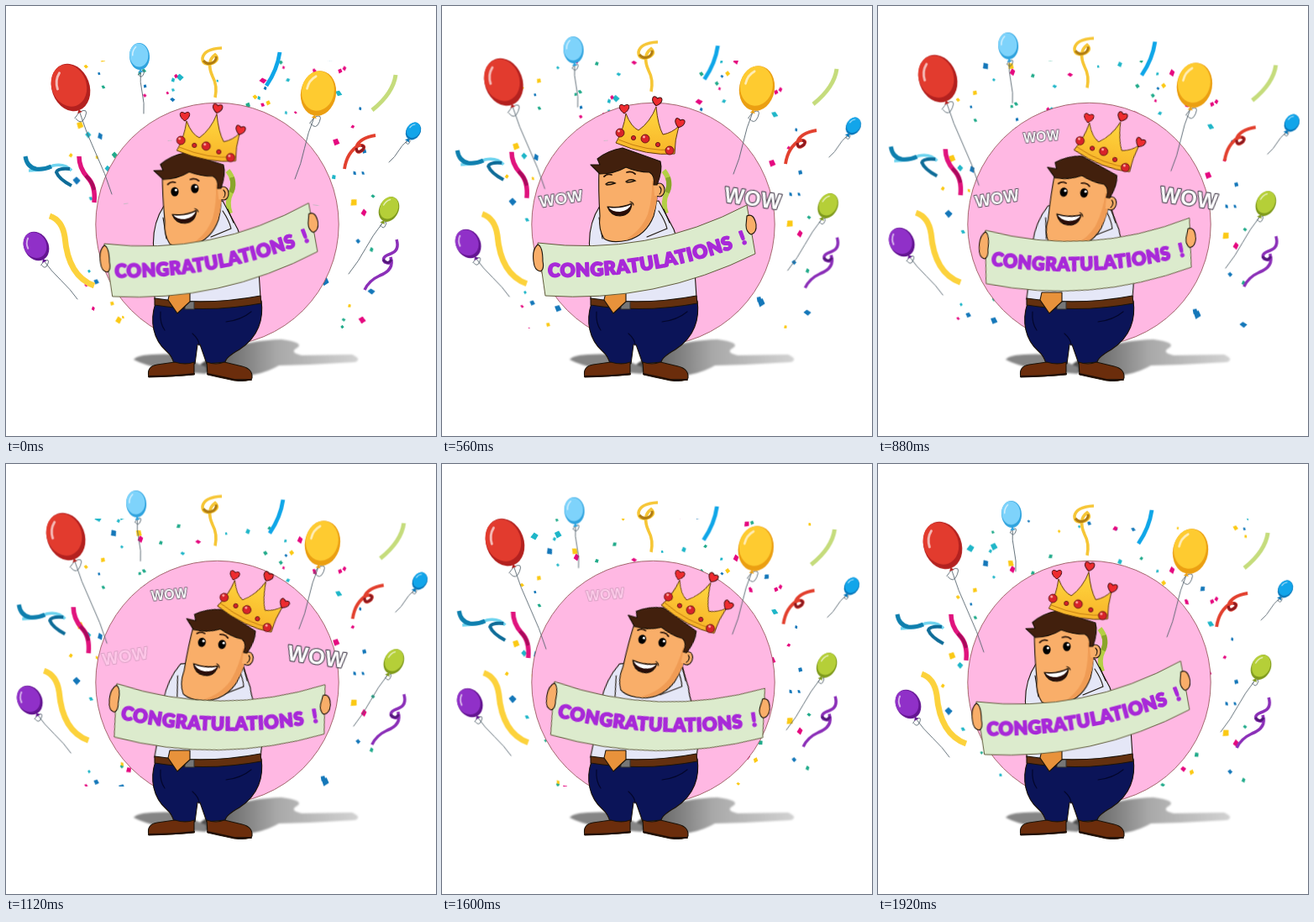
Animation, 512 px wide and 512 px high, one loop 2000 ms. Source, as an HTML page:

```html
<!DOCTYPE html>
<html lang="en">
<head>
<meta charset="utf-8">
<title>Congratulations</title>
<style>
html, body { margin: 0; width: 100%; height: 100%; overflow: hidden; background: #fff; }
svg { display: block; width: 100vw; height: 100vh; }
.ink { stroke: #1a1209; stroke-width: 1.1; stroke-linejoin: round; }
.line { fill: none; stroke-linecap: round; }
.ribbon path { fill: none; }
.skin { fill: #f9ae69; }

.drift { animation: drift 1s cubic-bezier(.37, 0, .63, 1) infinite alternate; }
.fall { animation: fall 2s linear infinite; }
.shirt { animation: lean 2s infinite; transform-origin: 0 348px; }
.head { animation: head 2s infinite; }
.crown { animation: crown 2s infinite; }
.banner { animation: banner 2s infinite; }
.face { animation: nod 2s infinite; }
.open { animation: open 2s step-end infinite; }
.shut { animation: shut 2s step-end infinite; }
.wow text {
  font: bold 25px "Liberation Sans", Arial, sans-serif; letter-spacing: .5px; text-anchor: middle;
  fill: #fff; stroke: #5a525f; stroke-width: 2.4; stroke-linejoin: round; paint-order: stroke;
  animation: wow 2s linear infinite both;
}
.title {
  font: 900 22px Lato, "Open Sans", sans-serif; letter-spacing: .6px; word-spacing: 5px;
  fill: #a829d8; stroke: #a829d8; stroke-width: 1.7; stroke-linejoin: round;
}

@keyframes drift { to { transform: translate(var(--dx), var(--dy)); } }
@keyframes fall { to { transform: translateY(90px); } }
@keyframes lean {
  0%, 28%, 96%, 100% { transform: skewX(0deg); }
  28% { animation-timing-function: ease-in; }
  44% { transform: skewX(-7.5deg); animation-timing-function: ease-out; }
  64% { transform: skewX(-11deg); }
  80% { transform: skewX(-12deg); animation-timing-function: ease-in-out; }
}
@keyframes head {
  0%, 96%, 100% { transform: translate(176px, 195px) rotate(-2deg); animation-timing-function: ease-out; }
  12% { transform: translate(178px, 189px) rotate(0deg); }
  28% { transform: translate(177px, 188px) rotate(0deg); animation-timing-function: ease-in; }
  44% { transform: translate(202px, 191px) rotate(9.5deg); animation-timing-function: ease-out; }
  64% { transform: translate(219px, 181px) rotate(14deg); }
  80% { transform: translate(222px, 179px) rotate(16deg); animation-timing-function: ease-in-out; }
}
@keyframes crown {
  0%, 96%, 100% { transform: translate(213px, 131px) rotate(-.5deg); animation-timing-function: ease-out; }
  12% { transform: translate(217px, 125px) rotate(0deg); }
  28% { transform: translate(217px, 122px) rotate(0deg); animation-timing-function: ease-in; }
  44% { transform: translate(251px, 133px) rotate(11deg); animation-timing-function: ease-out; }
  64% { transform: translate(278px, 132px) rotate(16.5deg); }
  80% { transform: translate(283px, 132px) rotate(17.5deg); animation-timing-function: ease-in-out; }
}
@keyframes banner {
  0%, 96%, 100% { transform: translate(117px, 283px) rotate(-.8deg) scaleX(.98); animation-timing-function: ease-out; }
  12% { transform: translate(115px, 282px) rotate(0deg) scaleX(1); }
  28% { transform: translate(114px, 282px) rotate(0deg) scaleX(1); animation-timing-function: ease-in; }
  44% { transform: translate(128px, 267px) rotate(7.2deg) scaleX(.96); animation-timing-function: ease-out; }
  64% { transform: translate(133px, 260px) rotate(11.7deg) scaleX(.985); }
  80% { transform: translate(134px, 259px) rotate(12.2deg) scaleX(.99); animation-timing-function: ease-in-out; }
}
@keyframes nod {
  0%, 44%, 96%, 100% { transform: translateY(3px); }
  12%, 28%, 64%, 80% { transform: translateY(0); }
}
@keyframes open { 0%, 36%, 72% { opacity: 1; } 24%, 60% { opacity: 0; } }
@keyframes shut { 0%, 36%, 72% { opacity: 0; } 24%, 60% { opacity: 1; } }
@keyframes wow {
  0% { transform: scale(.1); opacity: 1; }
  8% { transform: scale(1); }
  41% { transform: scale(1.03); opacity: 1; }
  50%, 100% { transform: scale(1.08); opacity: 0; }
}
</style>
</head>
<body>
<svg viewBox="0 0 512 512" xmlns="http://www.w3.org/2000/svg">
  <defs>
    <clipPath id="area"><rect x="68" y="65" width="373" height="319"/></clipPath>
    <filter id="soft" x="-20%" y="-20%" width="140%" height="140%"><feGaussianBlur stdDeviation="1.3"/></filter>
    <linearGradient id="shade"><stop offset="0" stop-color="#444"/><stop offset=".5" stop-color="#a8a8a8"/><stop offset="1" stop-color="#d2d2d2"/></linearGradient>
    <linearGradient id="gold" x2="0" y2="1"><stop offset="0" stop-color="#ffd93f"/><stop offset="1" stop-color="#f8b329"/></linearGradient>
    <path id="heart" d="M0 6C-9 0-6-8 0-3C6-8 9 0 0 6Z" fill="#ee2b2f" stroke="#3d0a0a"/>
    <path id="arc" d="M5 40Q134 45 256-2"/>
  </defs>

  <g clip-path="url(#area)"><g class="fall" id="confetti"></g></g>
  <circle cx="251.500" cy="260" r="144.700" fill="#ffb8e3" stroke="#9a5a5f" stroke-width=".9"/>

  <g class="ribbon">
    <path d="M264 196Q274 208 268 222Q262 234 267 247" stroke="#b4cf45" stroke-width="6"/>
    <path d="M269 204Q272 214 268 222" stroke="#8aa52b" stroke-width="6"/>
    <g class="drift" style="--dx:-8px;--dy:-12px">
      <path d="M27 196Q44 196 56 190Q70 187 78 196" stroke="#6fd4ef" stroke-width="3.500"/>
      <path d="M23 179Q25 192 36 194Q46 195 54 191" stroke="#0e7fae" stroke-width="5"/>
      <path d="M76 194Q61 193 60 198Q63 206 78 214" stroke="#0e6c98" stroke-width="4"/>
    </g>
    <g class="drift" style="--dx:-7px;--dy:-9px">
      <path d="M87 179Q87 193 97 204Q107 214 105 234" stroke="#e0137d" stroke-width="5.500"/>
      <path d="M95 202Q103 209 105 219" stroke="#a80a5b" stroke-width="4"/>
    </g>
    <path class="drift" style="--dx:-7px;--dy:-4px" d="M52 250Q67 255 70 275Q74 322 105 333" stroke="#fcd23c" stroke-width="7"/>
    <g class="drift" style="--dx:0px;--dy:-12px">
      <path d="M257 50Q236 51 234 62Q234 72 246 68Q255 64 249 58Q238 66 246 84Q252 95 249 109" stroke="#f6c636" stroke-width="3.600"/>
      <path d="M235 65Q240 71 247 67Q251 64 250 60" stroke="#b07c12" stroke-width="3"/>
    </g>
    <path class="drift" style="--dx:4px;--dy:-13px" d="M326 55Q323 76 310 95" stroke="#0fa6e8" stroke-width="4.800"/>
    <path class="drift" style="--dx:10px;--dy:-12px" d="M464 82Q461 104 436 124" stroke="#c5dc7c" stroke-width="5"/>
    <g class="drift" style="--dx:10px;--dy:-10px">
      <path d="M440 154Q421 157 417 168Q417 178 425 171Q429 165 420 166Q406 174 403 194" stroke="#e2402e" stroke-width="3.800"/>
      <path d="M417 169Q418 177 425 171Q428 167 423 166" stroke="#8d1a20" stroke-width="3"/>
    </g>
    <g class="drift" style="--dx:9px;--dy:-4px">
      <path d="M465 278Q469 291 458 295Q446 299 451 305Q460 309 458 299Q463 314 445 321Q432 327 427 338" stroke="#8b2fb8" stroke-width="3.500"/>
      <path d="M449 302Q455 309 459 302" stroke="#55187c" stroke-width="3"/>
    </g>
  </g>
  <g id="balloons"></g>

  <g class="wow">
    <g transform="translate(143 236) rotate(-9) scale(.76)"><text style="animation-delay:160ms">WOW</text></g>
    <g transform="translate(369 238) rotate(8)"><text style="animation-delay:334ms">WOW</text></g>
    <g transform="translate(195 161) rotate(-5) scale(.63)"><text style="animation-delay:654ms">WOW</text></g>
  </g>

  <g filter="url(#soft)">
    <path d="M225 432C250 410 285 398 328 397Q358 401 345 408Q338 413 352 416L412 415Q424 420 416 424Q370 427 325 428Q300 443 255 442Z" fill="url(#shade)"/>
    <path d="M152 421Q158 413 205 415L238 430L238 438Q176 434 152 421Z" fill="#858585"/>
  </g>

  <path class="shirt ink" d="M188 238Q171 264 177 300L177 349Q240 359 303 347L300 300Q283 290 276 266L258 232Z" fill="#e5e7f7"/>
  <path class="shirt line ink" d="M187 252L191 277M258 244Q266 256 268 265L244 275M264 242L271 258"/>
  <path class="ink" d="M178 354C171 375 175 397 191 411Q198 417 200 426L225 426L228 403L231 403L239 426L261 424Q262 418 278 409C301 394 307 372 304 351Q240 364 178 354Z" fill="#0b1458"/>
  <path class="line" d="M222 390Q230 397 230 404M184 364Q183 378 189 386M292 364Q280 374 262 376" stroke="#03062b" stroke-width="1.2"/>
  <path class="ink" d="M177 348Q240 357 303 345L304 354Q240 366 177 356Z" fill="#63300f"/>
  <rect x="213" y="352" width="11" height="9" fill="#777" stroke="#333"/>
  <path class="ink" d="M195 341L219 341L219 352L204 366L193 350Z" fill="#e8923b"/>
  <g class="ink" fill="#6b2d0c">
    <path d="M170 442Q167 429 180 427L201 424Q214 428 224 424L224 439Q200 441 170 442Z"/>
    <path d="M239 424Q250 428 260 424L281 429Q294 432 293 443Q290 448 272 446L240 439Z"/>
  </g>
  <path class="line" d="M170 441Q200 441 224 438M240 438L272 445L292 445" stroke="#221005" stroke-width="2"/>

  <g class="head">
    <ellipse class="skin ink" cx="82" cy="31" rx="6" ry="8"/>
    <path class="skin ink" d="M10 6Q9 30 11 62Q9 78 16 89Q24 95 44 91Q66 85 75 62Q80 45 80 15L60 0Z"/>
    <path d="M78 20Q82 42 74 62Q64 86 40 91Q60 80 68 60Q74 40 73 20Z" fill="#f09c55"/>
    <path class="skin" d="M75 24h7v14h-6z"/>
    <path class="line ink" d="M82 27Q86 31 82 36"/>
    <path class="ink" d="M11 12L0 1L11 1L8-6Q20-16 38-19L83-3Q86 8 79 25L75 25Q77 14 70 10Q56 10 42 4Q28 12 11 12Z" fill="#42200d"/>
    <g class="face">
      <path class="line" d="M16 15Q20 11 25 13M43 10Q49 8 53 12" stroke="#2b1408" stroke-width="1.8"/>
      <g class="open">
        <ellipse cx="24" cy="24" rx="4.600" ry="5.600"/><ellipse cx="48" cy="21" rx="4.600" ry="5.600"/>
        <circle cx="25.500" cy="22" r="1.600" fill="#fff"/><circle cx="49.500" cy="19" r="1.600" fill="#fff"/>
      </g>
      <path class="shut line" d="M18 24Q23 20 29 23Q24 25 19 25M42 21Q48 17 53 20Q48 22 43 22" stroke="#1a1209" stroke-width="1.4"/>
      <path class="ink" d="M20 51Q36 53 49 47Q48 61 35 62Q24 62 20 51Z" fill="#2a0d08"/>
      <path d="M21.500 52Q36 54 48 48.500Q46 55 35 57Q25 57 21.500 52Z" fill="#fff"/>
      <path class="line ink" d="M47 45Q51 46 51 49"/>
    </g>
  </g>

  <g class="crown">
    <path d="M2 6Q8 22 17 26Q31 16 38-2Q40 20 46 31Q57 29 65 21Q60 38 60 54Q28 57-10 41Q-1 26 2 6Z" fill="url(#gold)" stroke="#5e380c"/>
    <path class="line" d="M-7 37Q28 52 59 49" stroke="#c57d12"/>
    <g fill="#d8232a" stroke="#4f0b0e" stroke-width=".8">
      <circle cx="-5" cy="29" r="5"/><circle cx="25" cy="36" r="5"/><circle cx="54" cy="50" r="5"/>
      <circle cx="11" cy="35" r="2.600"/><circle cx="40" cy="43" r="2.600"/>
    </g>
    <g fill="#ffb0a8"><circle cx="-6.500" cy="27" r="1.400"/><circle cx="23.500" cy="34" r="1.400"/><circle cx="52.500" cy="48" r="1.400"/></g>
    <use href="#heart"/>
    <use href="#heart" transform="translate(39 -9) rotate(10)"/>
    <use href="#heart" transform="translate(66 17) rotate(15)"/>
  </g>

  <g class="banner">
    <path d="M0 0Q131 17 249-45L259 13Q140 72 9 63Z" fill="#dcebcd" stroke="#5f5a3a"/>
    <path class="skin ink" d="M0 2Q-7 8-5 22Q-4 33 3 34Q8 32 6 22Q6 4 0 2Z"/>
    <path class="skin ink" d="M249-32Q257-36 260-22Q261-12 254-10Q248-13 248-21Z"/>
    <text class="title"><textPath href="#arc" startOffset="7">CONGRATULATIONS !</textPath></text>
  </g>
</svg>
<script>
const byId = id => document.getElementById(id);

// x, y, rx, ry, tilt, string end x, y, drift x, y, light, dark
const balloons = [
  [77, 97, 22.500, 29, -20, 126, 224, -6, -11, '#e23b2e', '#b3211f'],
  [159, 60, 12, 16, -4, 164, 128, -4, -13, '#7ed3fb', '#2fa3de'],
  [372, 104, 21, 27, 10, 344, 206, 5, -10, '#fecb30', '#eb9f12'],
  [485, 149, 8.500, 11, 32, 456, 186, 8, -10, '#12a5ea', '#0876b8'],
  [456, 242, 11.500, 15.500, 25, 408, 319, 6, -7, '#b5cf38', '#7f9a1d'],
  [36, 286, 14.500, 18, -28, 85, 349, -8, -5, '#9030c8', '#641591']
];

function balloon([x, y, rx, ry, tilt, ex, ey, dx, dy, light, dark]) {
  const a = tilt * Math.PI / 180, r = ry + 2;
  const kx = x - r * Math.sin(a), ky = y + r * Math.cos(a), b = rx / 4;
  const mx = (kx + ex) / 2, my = (ky + ey) / 2;
  return `<g class="drift" style="--dx:${dx}px;--dy:${dy}px">
    <path class="line" stroke="#55646e" stroke-width=".9" d="M${kx} ${ky}Q${(kx + mx) / 2 - 2} ${(ky + my) / 2} ${mx} ${my}T${ex} ${ey}
      M${kx} ${ky}l${-b} ${b * 1.3}M${kx} ${ky}q${b * 2} ${-b} ${b * 1.2} ${b}t${-b * 2} ${b * .4}"/>
    <g transform="translate(${x} ${y}) rotate(${tilt})">
      <path d="M0 ${ry - 1}l-3 4h6z" fill="${dark}"/>
      <ellipse rx="${rx}" ry="${ry}" fill="${dark}"/>
      <ellipse cx="${-rx * .05}" cy="${-ry * .1}" rx="${rx * .92}" ry="${ry * .88}" fill="${light}"/>
      <path class="line" d="M${-rx * .68} ${-ry * .12}Q${-rx * .66} ${-ry * .5} ${-rx * .3} ${-ry * .72}"
        stroke="#fff" stroke-opacity=".65" stroke-width="${rx * .13}"/>
    </g></g>`;
}
byId('balloons').innerHTML = balloons.map(balloon).join('');

let seed = 29;
const rand = () => (seed = seed * 16807 % 2147483647) / 2147483647;

function flake(x, y, size, color) {
  const w = size, h = size * (.7 + rand() * .5);
  return `<path transform="translate(${x} ${y}) rotate(${rand() * 90})" fill="${color}"
    d="M${-w} 0L${-w * .2} ${-h}L${w} ${-h * .2}L${w * .2} ${h}Z"/>`;
}

// larger pieces: x, y pairs per colour
const pieces = {
  '#1477b9': [112, 155, 380, 328, 138, 335, 128, 32, 84, 208, 435, 340],
  '#e5087f': [306, 89, 393, 162, 424, 374, 160, 39, 350, 40, 426, 246],
  '#1fb6c8': [138, 12, 110, 14, 396, 104, 207, 85],
  '#fbc914': [88, 142, 158, 32, 134, 374, 414, 234]
};
const colors = [...Object.keys(pieces), '#22ab8b'];
let flakes = '';
for (const [color, xy] of Object.entries(pieces))
  for (let i = 0; i < xy.length; i += 2) flakes += flake(xy[i], xy[i + 1], 4.600, color);
for (let i = 0; i < 140; i++)
  flakes += flake(68 + rand() * 373, -25 + rand() * 410, 1.800 + rand() * 1.800, colors[Math.floor(rand() * colors.length)]);
byId('confetti').innerHTML = flakes;

// hold every pose for 80 ms
const anims = document.getAnimations();
anims.forEach(a => a.pause());
let start;
function tick(now) {
  start ??= now;
  const t = Math.floor((now - start) % 2000 / 80) * 80;
  for (const a of anims) a.currentTime = t;
  requestAnimationFrame(tick);
}
requestAnimationFrame(tick);
</script>
</body>
</html>
```
